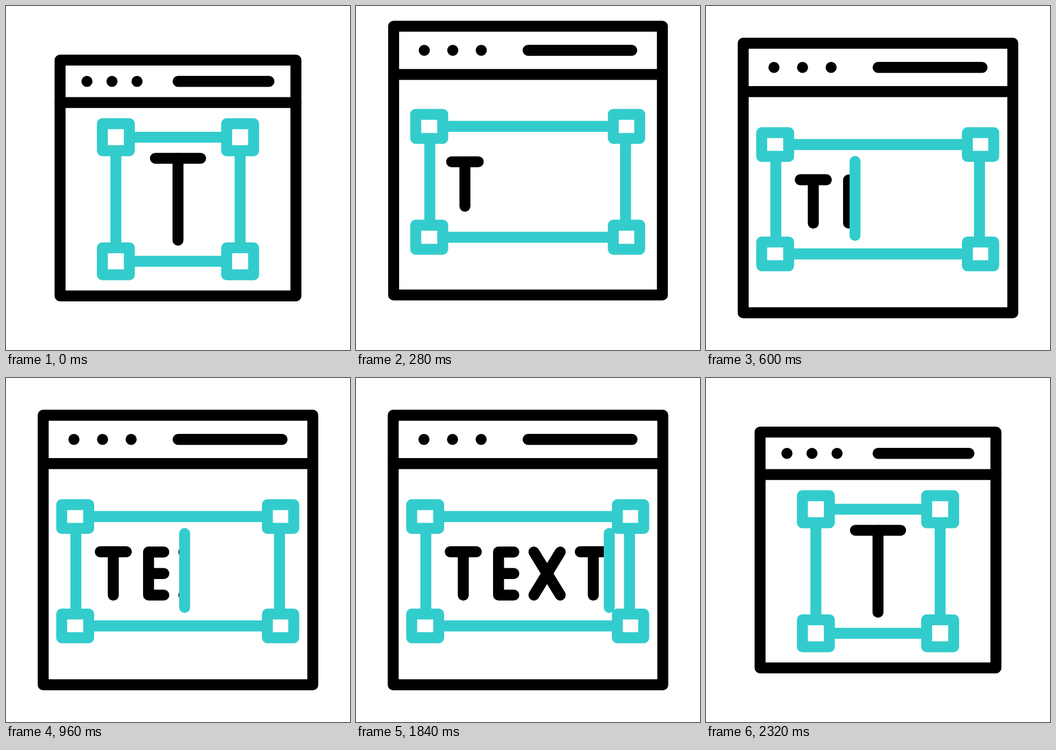
An HTML page with a canvas that plays this animation: 640x640 px, repeating every 2.4 s.

```html
<!DOCTYPE html>
<html lang="en">
<head>
<meta charset="utf-8">
<title>Text box</title>
<style>
  html, body { margin: 0; width: 100%; height: 100%; overflow: hidden; background: #fff; }
  canvas { display: block; width: 640px; height: 640px; }
</style>
</head>
<body>
<canvas id="stage" width="640" height="640"></canvas>
<script>
const ctx = document.getElementById('stage').getContext('2d');
const LOOP = 2400, LINE = 20.4, RISE = 33.2;
const BLACK = '#000', TEAL = '#33cccc';

const lerp = (a, b, k) => a + (b - a) * k;
const ramp = (t, from, to) => Math.min(1, Math.max(0, (t - from) / (to - from)));
const ease = (t, from, to) => {
  const u = ramp(t, from, to);
  return u * u * (3 - 2 * u);
};

function line(color, ...pts) {
  ctx.strokeStyle = color;
  ctx.beginPath();
  for (let i = 0; i < pts.length; i += 2) ctx.lineTo(pts[i], pts[i + 1]);
  ctx.stroke();
}

function box(color, x, y, halfW, halfH) {
  ctx.strokeStyle = color;
  ctx.fillStyle = '#fff';
  ctx.beginPath();
  ctx.rect(x - halfW, y - halfH, halfW * 2, halfH * 2);
  ctx.fill();
  ctx.stroke();
}

function letterT(x, half, top, bottom) {
  line(BLACK, x - half, top, x + half, top);
  line(BLACK, x, top, x, bottom);
}

function drawWindow(k) {
  const half = lerp(219.4, 250.8, k);
  box(BLACK, 320, 320, half, half);
  const bar = lerp(179.6, 159.2, k);
  line(BLACK, 320 - half, bar, 320 + half, bar);
  const y = lerp(140.2, 114.2, k);
  ctx.fillStyle = BLACK;
  for (let i = 0; i < 3; i++) {
    ctx.beginPath();
    ctx.arc(lerp(150.6 + i * 46.6, 126.4 + i * 53.2, k), y, 10.3, 0, Math.PI * 2);
    ctx.fill();
  }
  line(BLACK, 320.2, y, lerp(489.2, 513.6, k), y);
}

function drawFrame(k) {
  const top = lerp(244.1, 257.7, k), bottom = lerp(475, 461.2, k);
  const left = lerp(204.4, 128.7, k), right = lerp(435.6, 510.8, k);
  const lineL = lerp(204.4, 129.9, k), lineR = lerp(435.6, 508.8, k);
  for (const y of [top, bottom]) line(TEAL, left, y, right, y);
  for (const x of [lineL, lineR]) line(TEAL, x, top, x, bottom);
  const halfH = lerp(25.1, 22.1, k);
  for (const y of [top, bottom]) {
    box(TEAL, left, y, 25.1, halfH);
    box(TEAL, right, y, lerp(25.1, 24.5, k), halfH);
  }
}

function drawTyped(edge) {
  ctx.save();
  ctx.beginPath();
  ctx.rect(0, 0, edge, 640);
  ctx.clip();
  line(BLACK, 293.6, 323.8, 265.2, 323.8, 265.2, 403.9, 293.6, 403.9);
  line(BLACK, 265.2, 363.8, 293.6, 363.8);
  line(BLACK, 331, 323.8, 380, 403.9);
  line(BLACK, 380, 323.8, 331, 403.9);
  letterT(441.5, 24.3, 323.2, 404);
  ctx.restore();
}

function caretX(t) {
  const stops = [250.5, 324.7, 411.9, 509];
  let x = stops[0];
  x += (stops[1] - stops[0]) * ramp(t, 500, 780);
  x += (stops[2] - stops[1]) * ramp(t, 940, 1180);
  x += (stops[3] - stops[2]) * ramp(t, 1380, 1600);
  return lerp(x, stops[0], ramp(t, 1800, 2080));
}

function draw(t) {
  const grow = ease(t, 100, 300);
  const win = grow - ease(t, 2096, 2320);
  const first = grow - ease(t, 2084, 2320);
  const frame = ease(t, 100, 325) - ease(t, 2080, 2320);
  const lift = RISE * (grow - ease(t, 300, 500));
  const caret = caretX(t);

  ctx.fillStyle = '#fff';
  ctx.fillRect(0, 0, 640, 640);
  ctx.lineWidth = LINE;
  ctx.lineCap = ctx.lineJoin = 'round';

  ctx.save();
  ctx.translate(0, -lift);
  drawWindow(win);
  drawFrame(frame);
  letterT(lerp(320, 199.6, first), lerp(42, 24.3, first),
    lerp(283.4, 323.2, first), lerp(435.8, 404, first));
  drawTyped(caret);
  ctx.globalAlpha = ramp(t, 300, 380) - ramp(t, 2080, 2160);
  line(TEAL, caret, 289.2, caret, 426.9);
  ctx.restore();
}

const start = performance.now();
function tick(now) {
  draw(Math.max(0, now - start) % LOOP);
  requestAnimationFrame(tick);
}
draw(0);
requestAnimationFrame(tick);
</script>
</body>
</html>
```
